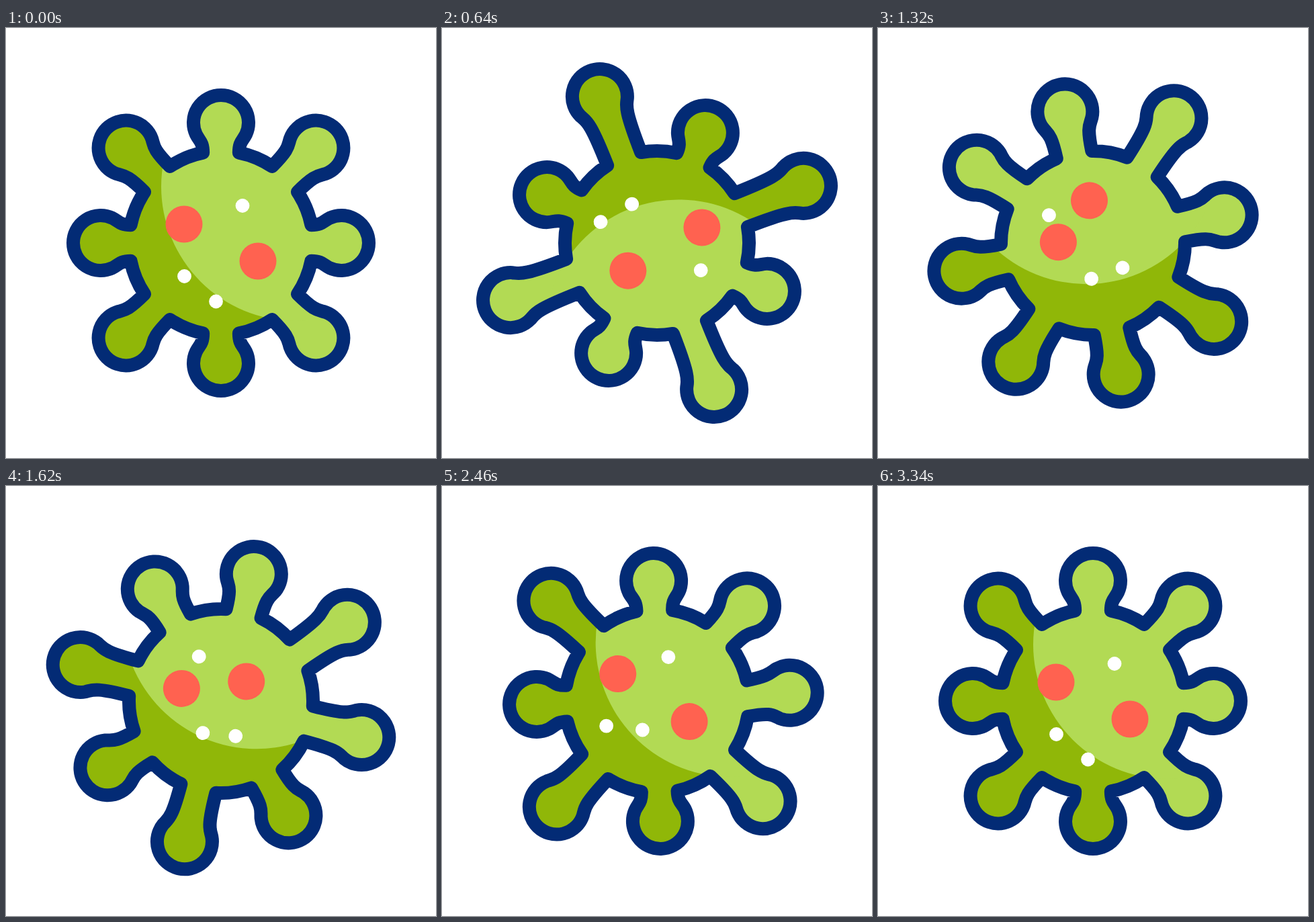
Recreate the animation shown at these times as an HTML page. Size 640 by 640 pixels, loop 3.6 s.

```html
<!DOCTYPE html>
<html lang="en">
<head>
<meta charset="utf-8">
<title>Spinning virus</title>
<style>
  html, body { margin: 0; width: 100%; height: 100%; overflow: hidden; background: #fff; }
  svg { display: block; width: 100vw; height: 100vh; }
</style>
</head>
<body>
<svg viewBox="-320 -320 640 640">
  <defs><clipPath id="inside"><path id="mask"/></clipPath></defs>
  <g id="virus">
    <g clip-path="url(#inside)">
      <rect x="-320" y="-320" width="640" height="640" fill="#b2da54"/>
      <path id="shade" fill="#90b708"/>
      <circle cx="111" cy="-84" r="200" fill="#b2da54"/>
    </g>
    <path id="outline" fill="none" stroke="#032b75" stroke-width="20" stroke-linejoin="round"/>
    <g id="dots"></g>
  </g>
</svg>
<script>
const LOOP = 3600, STEP = 20, BODY = 137, TIP = 41, BASE = 11.3;
const $ = id => document.getElementById(id);
const rad = deg => deg * Math.PI / 180;

// Eased 0 to 1 between two times.
function ramp(t, from, to) {
  const x = Math.min(1, Math.max(0, (t - from) / (to - from)));
  return x * x * (3 - 2 * x);
}
// Out during a..b, back during c..d.
const swing = (t, a, b, c, d) => ramp(t, a, b) - ramp(t, c, d);

// One full turn, eased like cubic-bezier(.4, 0, 0, 1).
function spin(t) {
  const x = Math.min(1, Math.max(0, (t - 12) / 2750));
  let lo = 0, hi = 1;
  for (let i = 0; i < 30; i++) {
    const s = (lo + hi) / 2;
    if (1.2 * s * (1 - s) ** 2 + s ** 3 < x) lo = s; else hi = s;
  }
  return 360 * ramp(lo, 0, 1);
}

// Diagonal arms (odd k) stretch twice; the straight ones once, in between.
const reach = [27.4, 42.4, 35.8, 31.8];
function armLength(k, t) {
  if (k % 2) {
    const second = k === 1 ? -10 : 34;
    return 200 + 34 * swing(t, 0, 540, 640, 1240) + second * swing(t, 1320, 1940, 2140, 2780);
  }
  const [fall, end] = k === 2 ? [1900, 2950] : [1320, 1940];
  return 179 + reach[k / 2] * swing(t, 640, 1240, fall, end);
}
const bend = t => -3 * swing(t, 1320, 1940, 2140, 2950);

// Point at sideways offset x and distance d along a direction.
function at(x, d, deg) {
  const c = Math.cos(rad(deg)), s = Math.sin(rad(deg));
  return (x * c + d * s).toFixed(2) + ' ' + (x * s - d * c).toFixed(2);
}

const tx = TIP * Math.cos(rad(25)), ty = TIP * Math.sin(rad(25));
function armPath(k, t) {
  const a = k * 45, d = armLength(k, t), dir = k === 2 ? a + bend(t) : a;
  const p = (x, y) => at(x, d - y, dir);
  return at(0, BODY, a - BASE)
    + `C${p(-27, 28)} ${p(5 - tx, ty + 10)} ${p(-tx, ty)}`
    + `A${TIP} ${TIP} 0 1 1 ${p(tx, ty)}`
    + `C${p(tx - 5, ty + 10)} ${p(27, 28)} ${at(0, BODY, a + BASE)}`;
}

// Spots: radius, colour, lag, then home and three stops on the way.
const times = [0, 640, 1320, 1960, 3340];
const RED = '#ff6250', WHITE = '#fff';
const spots = [
  [27.5, RED, 0, [-55, -28], [-48, -52], [-27, -44], [-58, -48]],
  [27.5, RED, 0, [55, 27], [55, 23], [50, -39], [44, 34]],
  [10.4, WHITE, 0, [32, -55.5], [11, -76], [-1, -77.5], [13, -69]],
  [10.4, WHITE, 250, [-54.5, 49.5], [-38, 57.5], [-46, 27], [-79.5, 33]],
  [10.4, WHITE, 250, [-7.5, 87], [5, 89.5], [-7, 57], [-25, 36]]
].map(([r, fill, lag, ...stops]) => {
  const el = document.createElementNS('http://www.w3.org/2000/svg', 'circle');
  el.setAttribute('r', r);
  el.setAttribute('fill', fill);
  $('dots').append(el);
  return { el, lag, stops: [...stops, stops[0]] };
});

function place({ el, lag, stops }, t) {
  let [x, y] = stops[0];
  for (let i = 1; i < stops.length; i++) {
    const u = ramp(t, times[i - 1] + lag, times[i]);
    x += u * (stops[i][0] - stops[i - 1][0]);
    y += u * (stops[i][1] - stops[i - 1][1]);
  }
  el.setAttribute('cx', x.toFixed(2));
  el.setAttribute('cy', y.toFixed(2));
}

$('shade').setAttribute('d', 'M0 0L' + [149, 200, 250, 300, 337].map(a => at(0, 450, a)).join('L') + 'Z');

function draw(t) {
  const arc = `A${BODY} ${BODY} 0 0 1 `;
  const arms = Array.from({ length: 8 }, (_, k) => armPath(k, t));
  const d = 'M' + arms.join(arc) + arc + at(0, BODY, -BASE) + 'Z';
  $('mask').setAttribute('d', d);
  $('outline').setAttribute('d', d);
  $('virus').setAttribute('transform', `rotate(${spin(t).toFixed(3)})`);
  spots.forEach(s => place(s, t));
}

const start = performance.now();
function tick() {
  const t = (performance.now() - start) % LOOP;
  draw(Math.floor(t / STEP) * STEP);
  requestAnimationFrame(tick);
}
tick();
</script>
</body>
</html>
```
